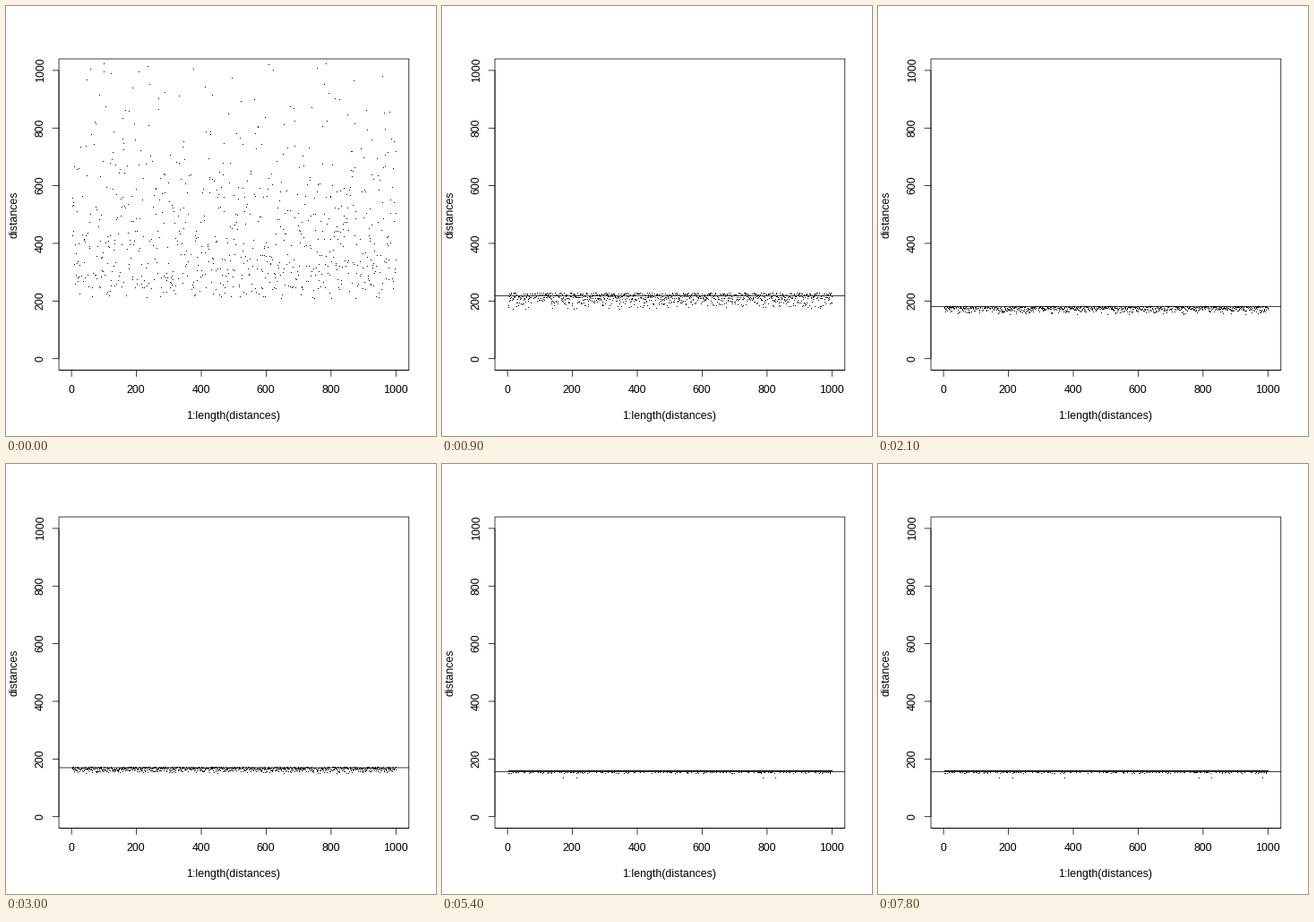
Write a matplotlib script that moves like this. It is 480x480 px and loops after 8000 ms.

```python
import numpy as np
import matplotlib.pyplot as plt
from matplotlib.animation import FuncAnimation

SIZE, DPI = 480, 72
FRAME_MS, LOOP_MS, STEP_MS = 100, 8000, 300
LINE_HEIGHT = 14.4
LEFT, RIGHT = 4.1 * LINE_HEIGHT, SIZE - 2.1 * LINE_HEIGHT
TOP, BOTTOM = 4.1 * LINE_HEIGHT, SIZE - 5.1 * LINE_HEIGHT
COUNT = 1000
SETTLED = 18

# Key thresholds; the decline between them is logarithmic in the step
KEY_STEPS = [1, 2, 5, 10, 14, 18]
KEY_THRESHOLDS = [262, 241, 190, 170, 162.3, 156]

# Discrete distances that remain once the threshold is small
LEVELS = [159, 156, 150, 147, 134]
LEVEL_ODDS = [.2, .645, .11, .04, .005]


def px(x):
    return LEFT + (x + 38.96) * (RIGHT - LEFT) / 1078.92


def py(y):
    return BOTTOM - (y + 40) * (BOTTOM - TOP) / 1080


def threshold_at(step):
    return np.interp(np.log(step), np.log(KEY_STEPS), KEY_THRESHOLDS)


def first_sample(rng):
    """Wide, right-skewed scatter, part of it beyond the plot."""
    distances = (222 + 300 * np.abs(rng.normal(size=COUNT)) ** 1.25
                 + rng.normal(0, 16, COUNT))
    hidden = (distances > 1030) | (rng.random(COUNT) < .18)
    return np.where(hidden, np.nan, distances)


def sample(step):
    rng = np.random.default_rng(40 + step)
    if step == 0:
        return first_sample(rng)
    upper = threshold_at(step) + 57 * np.exp(1 - step)
    lower = 145 + 27 * np.exp(-.4 * (step - 2))
    spread = lower + (upper - lower) * rng.random(COUNT) ** .38
    levels = rng.choice(LEVELS, COUNT, p=LEVEL_ODDS)
    discrete = rng.random(COUNT) < (step - 10) / (SETTLED - 10)
    return np.where(discrete, levels, spread)


def settle(distances, rounds):
    """Redraw a few low points in each round after the line stops."""
    distances = distances.copy()
    rng = np.random.default_rng(7)
    for _ in range(rounds):
        picks = rng.integers(50, 990, 8)
        picks = picks[distances[picks] < LEVELS[0]]
        distances[picks] = rng.choice(LEVELS[1:], len(picks),
                                      p=[.8, .1, .07, .03])
    return distances


plt.rcParams["font.family"] = "Liberation Sans"
fig = plt.figure(figsize=(SIZE / DPI, SIZE / DPI), dpi=DPI, facecolor="white")
ax = fig.add_axes([0, 0, 1, 1])
ax.set_xlim(0, SIZE)
ax.set_ylim(SIZE, 0)
ax.axis("off")


def stroke(xs, ys):
    return ax.plot(xs, ys, color="black", lw=.75, snap=False,
                   solid_capstyle="butt", solid_joinstyle="miter")[0]


def label_below(x, line, text):
    ax.text(x - .5, BOTTOM + (line + .8) * LINE_HEIGHT, text, fontsize=12.4,
            ha="center", va="baseline")


def label_left(y, line, text):
    ax.text(LEFT - (line + .2) * LINE_HEIGHT, y - .5, text, fontsize=12.4,
            ha="center", va="baseline", rotation=90, rotation_mode="anchor")


stroke([LEFT, RIGHT, RIGHT, LEFT, LEFT, RIGHT],
       [BOTTOM, BOTTOM, TOP, TOP, BOTTOM, BOTTOM])
stroke([px(0), px(1000)], [BOTTOM, BOTTOM])
stroke([LEFT, LEFT], [py(0), py(1000)])
for tick in range(0, 1001, 200):
    stroke([px(tick)] * 2, [BOTTOM, BOTTOM + LINE_HEIGHT / 2])
    stroke([LEFT, LEFT - LINE_HEIGHT / 2], [py(tick)] * 2)
    label_below(px(tick), 1, str(tick))
    label_left(py(tick), 1, str(tick))
label_below((LEFT + RIGHT) / 2, 3, "1:length(distances)")
label_left((TOP + BOTTOM) / 2, 3, "distances")

threshold = stroke([LEFT, RIGHT], [0, 0])
dots, = ax.plot([], [], ",", color="black")

indices = px(np.arange(1, COUNT + 1))
samples = [sample(step) for step in range(SETTLED + 1)]


def draw(frame):
    tick = frame * FRAME_MS // STEP_MS
    step = min(tick, SETTLED)
    distances = settle(samples[step], max(0, tick - SETTLED - 1))
    dots.set_data(indices, py(distances))
    threshold.set_visible(step > 0)
    threshold.set_ydata([py(threshold_at(max(step, 1)))] * 2)
    return dots, threshold


animation = FuncAnimation(fig, draw, frames=LOOP_MS // FRAME_MS,
                          interval=FRAME_MS, repeat=True)
plt.show()
```
